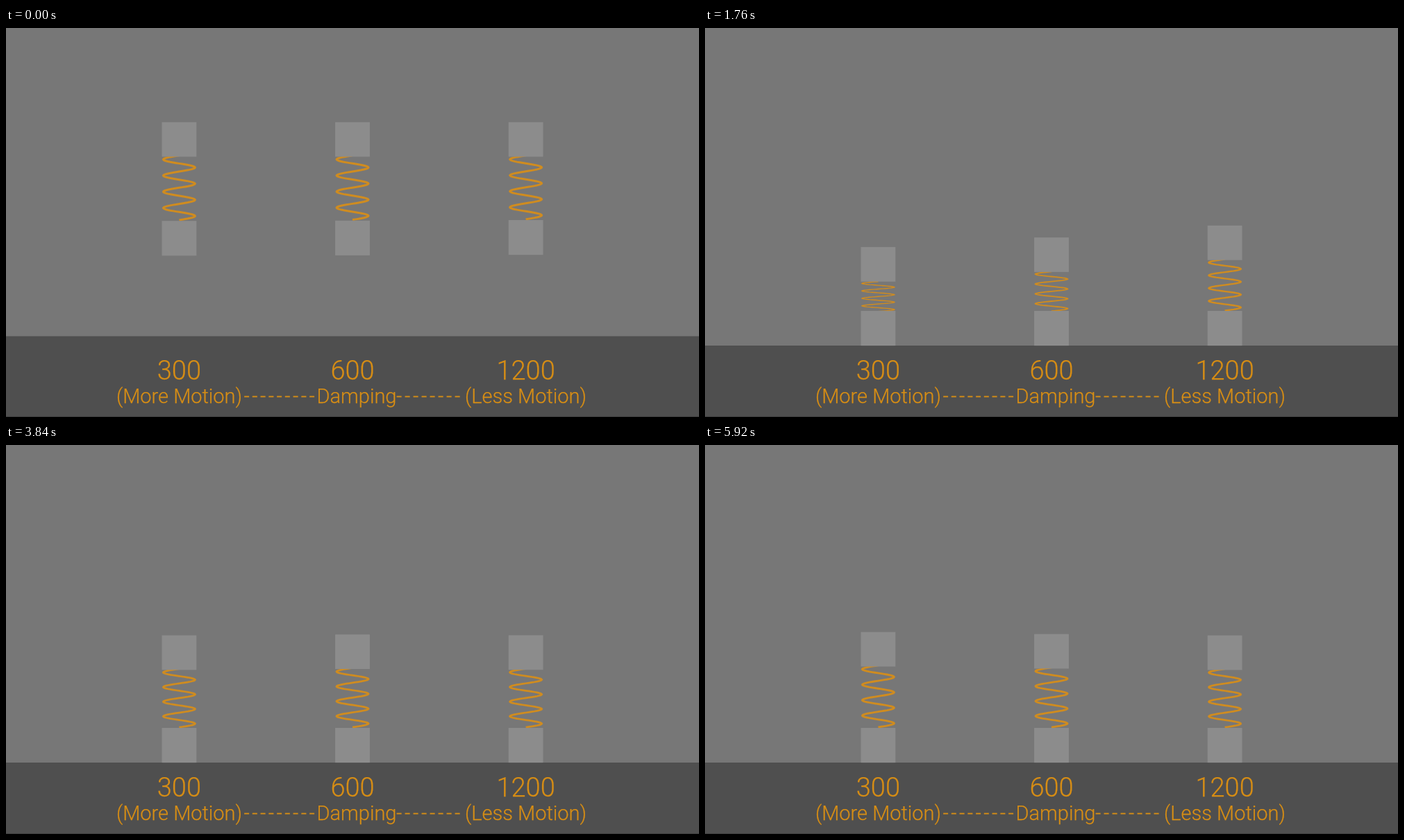
These frames come from a looping animation (998 by 561 pixels, 6000 ms). An HTML page:

```html
<!DOCTYPE html>
<html lang="en">
<head>
<meta charset="utf-8">
<title>Spring damping</title>
<style>
  html, body { margin: 0; width: 100%; height: 100%; overflow: hidden; background: #777; }
  svg { display: block; width: 998px; height: 561px; }
  text { font-family: Roboto, "Noto Sans", sans-serif; font-weight: 300; fill: #d88e14; stroke: #d88e14; stroke-width: 0.25; text-anchor: middle; }
  .value { font-size: 38px; }
  .label { font-size: 29px; }
  .dashes { text-anchor: start; }
  .coil { fill: none; stroke: #d08c1f; stroke-width: 3; }
  .box { fill: #8c8c8c; }
</style>
</head>
<body>
<svg id="stage" viewBox="0 0 998 561"></svg>
<script>
const LOOP = 6000, STEP = 80;
const BOX = 49.8, REST = 408, LAND = 0.295, START = 135.8;
const COIL = 93, TURNS = 4;

// rise: time from deepest compression to the first peak; the rest describes the ringing
const columns = [
  { x: 249.4, value: "300", low: 278.2, drop: 36, eq: 275, amp: 60, peak: 1.287, rise: 0.7, period: 1.137, decay: 0.5 },
  { x: 499, value: "600", low: 277.8, drop: 42, eq: 274.4, amp: 46, peak: 1.295, rise: 0.575, period: 1.143, decay: 0.7 },
  { x: 748.6, value: "1200", low: 277, drop: 50, eq: 274.9, amp: 19.8, peak: 1.31, rise: 0.575, period: 1.15, decay: 0.95 }
];

const stage = document.getElementById("stage");

function add(tag, attrs, content) {
  const el = document.createElementNS("http://www.w3.org/2000/svg", tag);
  for (const key in attrs) el.setAttribute(key, attrs[key]);
  if (content) el.textContent = content;
  return stage.appendChild(el);
}

function coilPath() {
  const count = TURNS * 32;
  let d = "";
  for (let i = 0; i <= count; i++) {
    const x = -22.9 * Math.sin(i / count * TURNS * 2 * Math.PI);
    d += (i ? "L" : "M") + x.toFixed(2) + " " + (i / count * COIL).toFixed(2);
  }
  return d;
}

function addDashes(x, count, pitch) {
  const xs = Array.from({ length: count }, (_, i) => x + i * pitch);
  add("text", { class: "label dashes", x: xs.join(" "), y: 541 }, "-".repeat(count));
}

function ringing(c, t) {
  const u = t - c.peak;
  const turns = u / (u < 0 ? 2 * c.rise : c.period);
  return c.eq - c.amp * Math.exp(-c.decay * u) * Math.cos(2 * Math.PI * turns);
}

function hermite(s, span, y0, v0, y1, v1) {
  const a = s * s, b = a * s;
  return (2 * b - 3 * a + 1) * y0 + (b - 2 * a + s) * span * v0
    + (3 * a - 2 * b) * y1 + (b - a) * span * v1;
}

function upperY(c, t) {
  if (t < LAND) return START + c.drop * (t / LAND) ** 3;
  const join = c.peak - c.rise;
  if (t >= join) return ringing(c, t);
  const span = join - LAND;
  const endSpeed = (ringing(c, join + 0.001) - ringing(c, join - 0.001)) / 0.002;
  return hermite((t - LAND) / span, span, START + c.drop, 3 * c.drop / LAND, ringing(c, join), endSpeed);
}

function lowerY(c, t) {
  return c.low + (REST - c.low) * Math.min(1, t / LAND) ** 2;
}

add("rect", { width: 998, height: 561, fill: "#777" });
const floor = add("rect", { width: 998, height: 117, fill: "#4f4f4f" });
add("rect", { y: 560, width: 998, height: 1, fill: "#3e3e3e" });

const path = coilPath();
for (const c of columns) {
  const left = c.x - BOX / 2;
  c.coil = add("path", { class: "coil", d: path });
  c.upper = add("rect", { class: "box", x: left, width: BOX, height: BOX });
  c.lower = add("rect", { class: "box", x: left, width: BOX, height: BOX + 0.3 });
  add("text", { class: "value", x: c.x, y: 506.5 }, c.value);
}

add("text", { class: "label", x: 249.5, y: 541 }, "(More Motion)");
addDashes(342.5, 9, 11.75);
add("text", { class: "label", x: 505, y: 541 }, "Damping");
addDashes(562, 8, 12);
add("text", { class: "label", x: 748.5, y: 541 }, "(Less Motion)");

function draw(ms) {
  const t = Math.floor(ms % LOOP / STEP) * STEP / 1000;
  floor.setAttribute("y", t ? 458 : 444.5);
  for (const c of columns) {
    const bottom = lowerY(c, t);
    const top = Math.min(upperY(c, t), bottom - BOX);
    const gap = bottom - top - BOX;
    const from = top + BOX - 0.038 * Math.max(0, gap - 43);
    const to = bottom + Math.max(-1.2, 0.04 * (62 - gap));
    c.upper.setAttribute("y", top);
    c.lower.setAttribute("y", bottom);
    c.coil.setAttribute("transform", `translate(${c.x} ${from}) scale(1 ${(to - from) / COIL})`);
  }
}

const begin = performance.now();
function tick() {
  draw(performance.now() - begin);
  requestAnimationFrame(tick);
}
draw(0);
requestAnimationFrame(tick);
</script>
</body>
</html>
```
